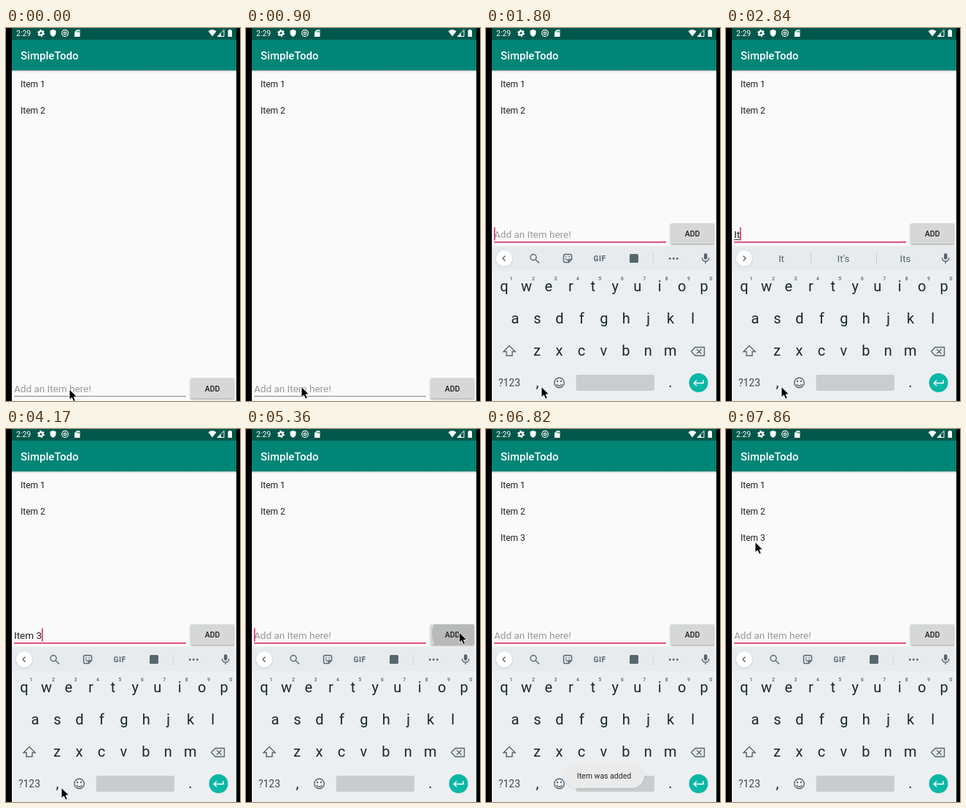
These frames come from a looping animation (321x510 px, 8000 ms). An HTML page:

```html
<!DOCTYPE html>
<html lang="en">
<head>
<meta charset="utf-8">
<title>Todo list demo</title>
<style>
html, body { margin: 0; width: 100%; height: 100%; overflow: hidden; background: #000; }
svg { display: block; width: 321px; height: 510px; font-family: Roboto, sans-serif; cursor: default; }
text { white-space: pre; }
.mid { text-anchor: middle; }
.med { font-weight: 500; }
.item { font-size: 12px; fill: #212121; }
.field { font-size: 13.5px; }
.key { font-size: 20px; fill: #15282f; }
.num { font-size: 7px; fill: #56666d; font-weight: 500; }
.word { font-size: 13.5px; fill: #56666e; }
.line { fill: none; stroke: #56666e; stroke-width: 1.4; }
.ink { fill: #56666e; }
</style>
</head>
<body>
<svg viewBox="0 0 321 510">
  <defs>
    <clipPath id="screen"><path d="M8 0H316V510H8Z"/></clipPath>
    <clipPath id="btnClip"><rect x="253" y="267" width="60" height="28" rx="1.5"/></clipPath>
    <linearGradient id="barShade" x2="0" y2="1">
      <stop stop-color="#000" stop-opacity=".2"/><stop offset="1" stop-color="#000" stop-opacity="0"/>
    </linearGradient>
    <filter id="soft" x="-20%" y="-30%" width="140%" height="170%"><feGaussianBlur stdDeviation="1"/></filter>
  </defs>
  <rect width="321" height="510"/>
  <g clip-path="url(#screen)">
    <rect x="8" width="308" height="510" fill="#fafafa"/>
    <rect x="8" y="58" width="308" height="3" fill="url(#barShade)"/>
    <rect x="8" width="308" height="16" fill="#00574b"/>
    <rect x="8" y="16" width="308" height="42" fill="#008577"/>

    <g fill="#fff">
      <text x="14" y="11" font-size="10.5">2:29</text>
      <circle cx="48" cy="7" r="2.7" fill="none" stroke="#fff" stroke-width="2.2"/>
      <circle cx="48" cy="7" r="4.2" fill="none" stroke="#fff" stroke-width="1.6" stroke-dasharray="2.2 2.2"/>
      <path d="M64.500 2l4 1.600v3q0 3.800-4 5.400q-4-1.600-4-5.400v-3z"/>
      <circle cx="81" cy="7" r="4.300" fill="none" stroke="#fff" stroke-width="1.200"/>
      <circle cx="81" cy="7" r="1.700" fill="none" stroke="#fff" stroke-width="1.200"/>
      <path d="M97 2.500h4.500v9.500h-7.500v-6.500z"/>
      <path d="M97.300 4v2M99 4v2M100.600 4v2" stroke="#00574b" stroke-width=".8"/>
      <path d="M277.500 4.500q5.500-4.500 11 0l-5.500 7z"/>
      <path d="M299 2.500v9h-9z" fill="none" stroke="#fff"/>
      <path d="M295 7v5h-5z"/>
      <path d="M304.500 3h1.500v-1h2.500v1h1.500v9h-5.500z"/>
      <text x="20" y="43" font-size="15" class="med">SimpleTodo</text>
    </g>

    <g class="item">
      <text x="20" y="80.500">Item 1</text>
      <text x="20" y="116.500">Item 2</text>
      <text x="20" y="152.500" id="newItem">Item 3</text>
    </g>

    <g id="form">
      <text x="11" y="286.500" class="field" fill="#999" id="hint">Add an Item here!</text>
      <text x="11" y="286.500" class="field" fill="#1c1c1c" id="typed"></text>
      <path id="compose" stroke="#333" stroke-width="1"/>
      <path id="rule"/>
      <rect id="caret" y="272.500" width="1.500" height="18" fill="#d81b60"/>
      <rect x="253" y="268.500" width="60" height="28" rx="1.500" opacity=".32" filter="url(#soft)"/>
      <rect x="253" y="267" width="60" height="28" rx="1.500" fill="#d6d7d7"/>
      <circle id="ripple" cx="288" cy="280" fill="#000" clip-path="url(#btnClip)"/>
      <text x="283" y="285" font-size="10.500" class="mid med" fill="#1d1d1d">ADD</text>
    </g>

    <g id="keyboard">
      <rect x="8" y="298" width="308" height="212" fill="#eceff1"/>
      <rect x="8" y="298" width="308" height="33" fill="#e7ebee"/>
      <circle cx="25" cy="315.500" r="11" opacity=".2" filter="url(#soft)"/>
      <circle cx="25" cy="315" r="11" fill="#fff"/>
      <path id="chevron" class="line"/>
      <g id="tools">
        <circle cx="65" cy="313.500" r="4" class="line"/>
        <path d="M68 316.500l5 5" class="line" stroke-width="1.800"/>
        <path d="M108.500 309.500h7q2 0 2 2v5l-4 4h-5q-2 0-2-2v-7q0-2 2-2zM117 316.500h-3.500v3.500M109 315q2 3.500 5 1.500" class="line"/>
        <path d="M109 312h1.500v1.500h-1.500zM113.500 312h1.500v1.500h-1.500z" class="ink"/>
        <text x="156" y="318.500" font-size="10" font-weight="700" letter-spacing=".6" class="mid ink">GIF</text>
        <rect x="197" y="309" width="12" height="12" rx="1.500" class="ink"/>
        <path d="M229.500 307v16" stroke="#cfd5d8"/>
        <path d="M251 314h2.600v2.600H251zM256 314h2.600v2.600H256zM261 314h2.600v2.600H261z" class="ink"/>
      </g>
      <g id="words" class="word mid">
        <path d="M116.500 307v16M206.500 307v16" stroke="#c5ccd0"/>
        <text x="76" y="320"></text><text x="161" y="320"></text><text x="246" y="320"></text>
      </g>
      <rect x="299" y="308" width="4.500" height="8.500" rx="2.200" class="ink"/>
      <path d="M296.500 314q0 5 4.700 5t4.700-5M301.200 319v3" class="line"/>

      <g id="keys"></g>
      <path d="M32 434.500l8 8h-4v5.500h-8v-5.500h-4z" class="line"/>
      <path d="M287 436.500h12.500v11.500H287l-5.500-5.750zM289 439l6.500 6.500m0-6.500l-6.500 6.500" class="line"/>
      <text x="32" y="490" font-size="14" class="mid" fill="#3b4d55">?123</text>
      <text x="70.500" y="491" class="key mid">,</text>
      <circle cx="100.500" cy="485" r="6.800" class="line"/>
      <path d="M96.500 487q4 4.500 8 0" class="line"/>
      <circle cx="98" cy="483" r="1.200" class="ink"/><circle cx="103" cy="483" r="1.200" class="ink"/>
      <rect x="123.500" y="474" width="107.500" height="22" rx="2.500" fill="#c9cdd0"/>
      <text x="253" y="491" class="key mid">.</text>
      <circle cx="291.500" cy="485" r="13" fill="#0ab7a5"/>
      <path d="M298 481.500v4h-12.500m3.500-3.700l-3.700 3.700 3.700 3.700" fill="none" stroke="#fff" stroke-width="1.500"/>
    </g>

    <g id="toast">
      <rect x="108" y="458" width="109" height="34" rx="17" opacity=".1" filter="url(#soft)"/>
      <rect x="108" y="457" width="109" height="34" rx="17" fill="#ebebec"/>
      <text x="162" y="478" font-size="10.500" class="mid" fill="#252525" id="toastText">Item was added</text>
    </g>
  </g>
  <path id="pointer" d="M0 0V14.500l3.300-3.100 2.300 5.200 2.600-1.100-2.200-5.100h4.500z" stroke="#fff" stroke-width=".9"/>
</svg>
<script>
const LOOP = 8000;
const $ = id => document.getElementById(id);
const set = (id, attrs) => { for (const k in attrs) $(id).setAttribute(k, attrs[k]); };
const show = (id, on) => $(id).setAttribute('visibility', on ? 'visible' : 'hidden');

// Value of the last step that has started
const step = (t, steps) => steps.reduce((v, s) => t >= s[0] ? s[1] : v, null);
const between = (t, a, b) => t >= a && t < b;

// Letter rows: first key centre, baseline
const PITCH = 30.45;
const rows = [['qwertyuiop', 25, 360], ['asdfghjkl', 40, 404], ['zxcvbnm', 70, 448]];
$('keys').innerHTML = rows.map(([letters, x0, y], r) => [...letters].map((c, i) => {
  const x = x0 + i * PITCH;
  const digit = r ? '' : `<text class="num mid" x="${x + 9.5}" y="345">${(i + 1) % 10}</text>`;
  return `<text class="key mid" x="${x}" y="${y}">${c}</text>${digit}`;
}).join('')).join('');

const typing = [[0, ''], [2550, 'I'], [2840, 'It'], [2990, 'Ite'], [3130, 'Item'],
  [3880, 'Item '], [4020, 'Item 3'], [5360, '']];
const carets = [[0, false], [1200, true], [2250, false], [2550, true], [3580, false], [3880, true],
  [4620, false], [5060, true], [5950, false], [6380, true], [6820, false], [7270, true], [7710, false]];
const hints = [[0, ''], [2550, "I|I'm|I'll"], [2840, "It|It's|Its"], [2990, 'Ite|Item|Items'],
  [3130, "Item|Items|Item's"], [3880, 'is|and|for'], [4020, '']];
const moves = [[0, [87, 494]], [450, [85, 493.5]], [750, [80, 492]], [900, [76, 490.5]],
  [4470, [92, 478]], [4620, [146, 430]], [4770, [216, 352]], [4910, [272, 294]], [5060, [292.5, 278]],
  [5800, [220, 201]], [5950, [126, 200]], [6090, [52, 160]], [6240, null], [7710, [40, 154.5]]];
const ripples = [[0, [0, 0]], [5210, [14, .12]], [5360, [33, .14]], [5500, [60, .08]], [5650, [0, 0]]];
const slides = [[0, 212], [1650, 80], [1800, 0]];
const fades = [[0, 0], [5500, .5], [5650, 1], [7410, .5], [7560, 0]];

let wasText = null;
function draw(t) {
  const text = step(t, typing);
  if (text !== wasText) $('typed').textContent = wasText = text;
  const end = 11 + (text ? $('typed').getComputedTextLength() : 0);
  const focused = t >= 1200;
  show('hint', !text);
  show('caret', step(t, carets));
  set('caret', { x: end });
  set('compose', { d: `M11 289.500H${end}` });
  show('compose', between(t, 2550, 3880));
  set('form', { transform: `translate(0 ${t < 1350 ? 211.5 : 0})` });
  set('rule', focused ? { d: 'M11 292.700H247', stroke: '#d81b60', 'stroke-width': 1.6 }
                      : { d: 'M11 292H247', stroke: '#858585', 'stroke-width': 1 });

  const [r, alpha] = step(t, ripples);
  set('ripple', { r, opacity: alpha });

  show('keyboard', t >= 1650);
  set('keyboard', { transform: `translate(0 ${step(t, slides)})` });
  const words = step(t, hints);
  $('tools').style.display = words ? 'none' : '';
  $('words').style.display = words ? '' : 'none';
  if (words) words.split('|').forEach((w, i) => { $('words').querySelectorAll('text')[i].textContent = w; });
  set('chevron', { d: words ? 'M23.500 311.500l3.500 3.500-3.500 3.500' : 'M26.500 311.500l-3.500 3.500 3.500 3.500' });

  show('newItem', t >= 5500);
  set('toast', { opacity: step(t, fades) });
  show('toastText', t >= 5650);

  const at = step(t, moves);
  show('pointer', at);
  if (at) set('pointer', { transform: `translate(${at})` });
}

const start = performance.now();
function tick() {
  draw((performance.now() - start) % LOOP);
  requestAnimationFrame(tick);
}
tick();
</script>
</body>
</html>
```
